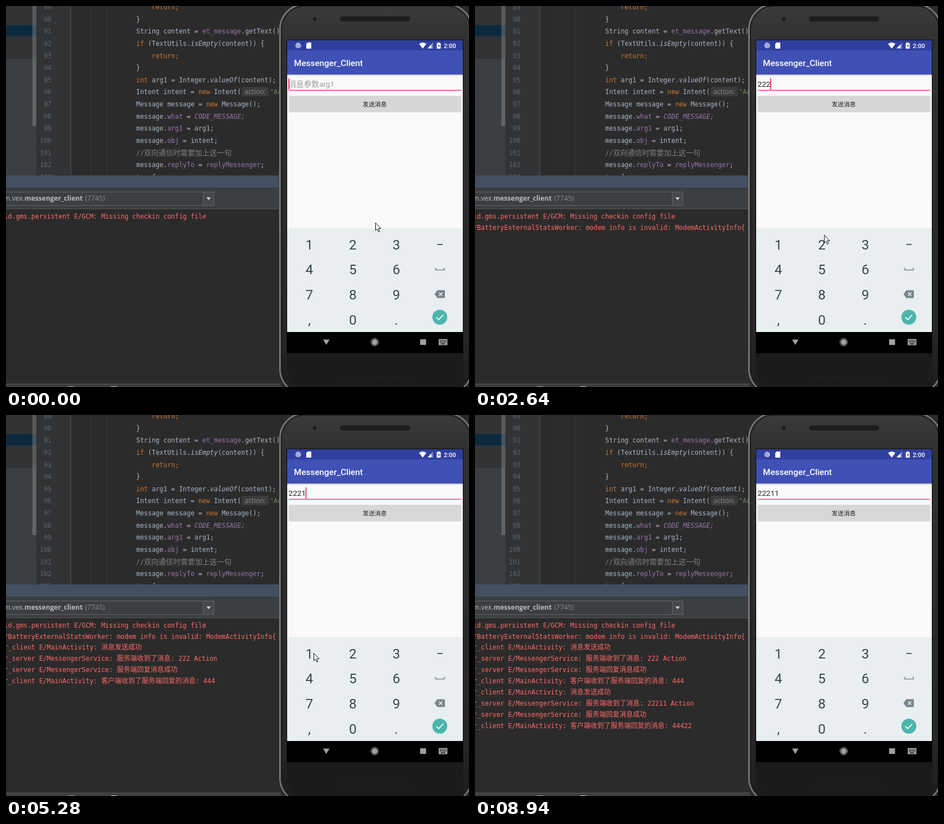
Animation, 825 px wide and 679 px high, one loop 9.04 s. Source, as an HTML page:

```html
<!DOCTYPE html>
<html lang="zh">
<head>
<meta charset="utf-8">
<title>Messenger_Client</title>
<style>
html, body { margin: 0; width: 100%; height: 100%; overflow: hidden; background: #2b2b2b; }
svg { display: block; width: 825px; height: 679px; }
text { white-space: pre; }
.mono { font: 11.5px 'DejaVu Sans Mono', monospace; fill: #a9b7c6; }
.ui { font: 12.2px 'Open Sans', sans-serif; fill: #bbb; }
.bold { font-size: 12px; font-weight: 700; }
.dim { fill: #8a8a8a; }
.app { font-family: Roboto, 'Noto Sans CJK SC', 'Noto Sans CJK', sans-serif; }
.z { font-family: 'Noto Sans CJK SC', 'Noto Sans CJK', sans-serif; }
.k { fill: #cc7832; }
.f { fill: #9876aa; }
.i { font-style: italic; }
.s { fill: #6a8759; }
.c { fill: #808080; }
#code .z { font-size: 13px; }
#log .z { font-size: 12px; }
#nums text { fill: #606366; text-anchor: end; }
#log text { fill: #ff6b68; }
#keys text { font-size: 24px; fill: #37474f; text-anchor: middle; }
</style>
</head>
<body>
<svg viewBox="0 0 825 679">
  <defs>
    <linearGradient id="shell" x2="0" y2="1">
      <stop offset="0" stop-color="#3b3b3b"/><stop offset=".1" stop-color="#303030"/>
      <stop offset=".85" stop-color="#262626"/><stop offset="1" stop-color="#1c1c1c"/>
    </linearGradient>
    <linearGradient id="drop" x2="0" y2="1">
      <stop offset="0" stop-opacity=".28"/><stop offset="1" stop-opacity="0"/>
    </linearGradient>
    <pattern id="mesh" width="4" height="4" patternUnits="userSpaceOnUse">
      <path fill="#0c0c0c" d="M0 0h4v4h-4z"/><path fill="#454545" d="M0 0h1.5v1.5h-1.5zM2 2h1.5v1.5h-1.5z"/>
    </pattern>
    <clipPath id="editor"><path d="M0 0H490V302H0z"/></clipPath>
  </defs>

  <!-- editor -->
  <path fill="#2b2b2b" d="M0 0H825V679H0z"/>
  <path fill="#313335" d="M0 0H115V302H0z"/>
  <path fill="#3c3f41" d="M0 94H54V302H0z"/>
  <path fill="#0d293e" d="M0 34H54V54H0z"/>
  <path fill="#a6a6a6" opacity=".35" d="M47 0H54V214H47z"/>
  <path stroke="#555" d="M115.5 0V302"/>
  <path stroke="#373737" d="M151.5 0V302M179.5 0V302"/>
  <g clip-path="url(#editor)">
    <g id="nums" class="mono"></g>
    <rect x="420" y="144" width="48" height="17" rx="3" fill="#3b3b3b"/>
    <text class="ui dim" x="425" y="157">action:</text>
    <g id="code" class="mono"></g>
    <text class="mono s" x="470" y="157.400">"Action"</text>
  </g>

  <!-- log panel -->
  <path fill="#3c3f41" d="M0 324H490V362H0zM0 673H490V679H0z"/>
  <path fill="#435062" d="M0 302H490V324H0z"/>
  <path stroke="#2f3234" d="M0 324.5H490"/>
  <path stroke="#555" d="M0 361.5H490M0 673.5H490"/>
  <path fill="#45494a" d="M351 331H371V356H351z"/>
  <path fill="none" stroke="#646464" d="M0 331.5H370.5V355.5H0M351.5 331V356"/>
  <path fill="#ccc" d="M357 341h8l-4 5z"/>
  <text class="ui" x="33" y="347" text-anchor="end">m.vex.</text>
  <text class="ui bold" x="33" y="347">messenger_client</text>
  <text class="ui dim" x="141" y="347">(7745)</text>
  <path fill="#aaa" d="M110 678h11v1h-11z"/>
  <path fill="#e8c78a" d="M187 678h11v1h-11z"/>
  <g id="log" class="mono"></g>

  <!-- phone -->
  <path fill="#3a3a3a" d="M486 287H489V400H486z"/>
  <rect x="488" y="-3" width="342" height="694" rx="44" fill="url(#shell)" stroke="#858585" stroke-width="2"/>
  <rect x="489.500" y="-1.500" width="339" height="691" rx="43" fill="none" stroke="#4c4c4c"/>
  <rect x="491" y="0" width="336" height="688" rx="42" fill="none" stroke="#1a1a1a" stroke-width="1.500"/>
  <path fill="#1b1b1b" d="M500 618H815V679H518Q500 665 500 640z"/>
  <circle cx="550" cy="23" r="3.500" fill="#1d1d1f"/>
  <rect x="595" y="18.500" width="125" height="9" rx="4.500" fill="url(#mesh)"/>
  <rect x="598" y="659" width="123" height="9" rx="4.500" fill="url(#mesh)"/>
  <path fill="#0c0c0c" d="M500 60H815V619H500z"/>

  <g class="app">
    <path fill="#fafafa" d="M501 122H814V396H501z"/>
    <path fill="url(#drop)" d="M501 122H814V125H501z"/>
    <path fill="#303f9f" d="M501 61H814V79H501z"/>
    <path fill="#3f51b5" d="M501 79H814V122H501z"/>
    <circle cx="520.500" cy="70.500" r="5" fill="#9fa8da"/>
    <path fill="none" stroke="#c5cae9" d="M517 67a5 5 0 0 1 7 7"/>
    <path fill="#fff" d="M537.500 65H543Q544 65 544 66V75Q544 76 543 76H536Q535 76 535 75V67.500z
      M736 67.500Q742.500 62.500 749 67.500L742.500 76z M761 65.500V75.500H751z
      M769.500 65h3v1h2v10h-7v-10h2z"/>
    <path fill="#303f9f" d="M771.500 67.500l-2 4h1.500v3l2-4h-1.500z"/>
    <path fill="#7c87c4" d="M758 68.500L761 65.500V75.500H758z"/>
    <text x="780" y="74.500" font-size="11" font-weight="500" fill="#fff">2:00</text>
    <text x="513" y="106.500" font-size="15.3" font-weight="500" fill="#fff">Messenger_Client</text>

    <text id="field" x="503.500" y="144" font-size="13.6"></text>
    <path fill="#ff4081" d="M504 149.500H811V151H504z"/>
    <path id="caret" fill="#ff4081" d="M0 129h2v20h-2z"/>
    <rect id="shade" x="502" y="160" width="310.500" height="32" rx="3" opacity=".18"/>
    <rect id="button" x="503.500" y="160" width="308" height="29.500" rx="2"/>
    <text class="z" x="657" y="178.500" font-size="10.75" font-weight="500" fill="#1c1c1c" text-anchor="middle">发送消息</text>

    <path fill="#e9eef1" d="M501 396H814V581H501z"/>
    <path id="press" fill="#d9dee1" d="M580 401h77.500v45.500h-77.500z"/>
    <g id="keys"></g>
    <path stroke="#37474f" stroke-width="1.700" d="M768.500 425H778"/>
    <path fill="none" stroke="#7b888e" stroke-width="1.600" d="M765.500 466.500v4h15.500v-4"/>
    <path fill="#78868c" d="M763.500 513.500l5-7H781q1 0 1 1v12q0 1-1 1H768.500z"/>
    <path stroke="#e9eef1" stroke-width="1.600" d="M771.500 510.500l6 6m0-6l-6 6"/>
    <circle cx="773" cy="554.500" r="13.300" fill="#4db6ac"/>
    <path fill="none" stroke="#fff" stroke-width="1.800" d="M767 555l4 4 8-8.500"/>

    <path d="M501 581H814V618H501z"/>
    <path fill="#a0a0a0" d="M565 594.500h11.500l-5.750 9.500zM738 594h10.500v10h-10.500zM771 593.500h15.500v11h-15.500z"/>
    <circle cx="657" cy="599" r="5.200" fill="#a0a0a0"/>
    <circle cx="657" cy="599" r="6.700" fill="none" stroke="#a0a0a0"/>
    <path stroke="#000" stroke-width="1.300" stroke-dasharray="1.400 1.100" d="M773 596.500h12M773 599h12"/>
    <path stroke="#000" stroke-width="1.300" d="M775 602h7.500"/>
  </g>
  <path id="mouse" fill="#fff" stroke="#111" d="M.5 .5V14L3.500 11.200 5.700 16.300 7.800 15.400 5.600 10.400H10z"/>
</svg>
<script>
const LOOP = 9040;
const $ = id => document.getElementById(id);

// ~x ...~ gives a token the class x; runs of Chinese get their own font
const mark = s => s
  .replace(/~(\w+) (.*?)~/g, (_, c, body) => `<tspan class="${[...c].join(' ')}">${body}</tspan>`)
  .replace(/[\u4e00-\u9fff]+/g, '<tspan class="z">$&</tspan>');
const line = (x, y, s) => `<text x="${x}" y="${y}">${mark(s)}</text>`;

const code = [
  '    ~k return;~',
  '}',
  'String content = ~f et_message~.getText()',
  '~k if~ (TextUtils.~i isEmpty~(content)) {',
  '    ~k return;~',
  '}',
  '~k int~ arg1 = Integer.~i valueOf~(content);',
  'Intent intent = ~k new~ Intent(',
  'Message message = ~k new~ Message();',
  'message.~f what~ = ~fi CODE_MESSAGE;~',
  'message.~f arg1~ = arg1;',
  'message.~f obj~ = intent;',
  '~c //双向通信时需要加上这一句~',
  'message.~f replyTo~ = ~f replyMessenger~;',
  '~k try~ {'
];
const rowY = i => 6 + i * 21.63;
$('code').innerHTML = code.map((s, i) => line(232, rowY(i), s)).join('');
$('nums').innerHTML = code.map((s, i) => line(81, rowY(i), `${89 + i}`)).join('');

const reply = (sent, got) => [
  'r_client E/MainActivity: 消息发送成功',
  `r_server E/MessengerService: 服务端收到了消息: ${sent} Action`,
  'r_server E/MessengerService: 服务端回复消息成功',
  `r_client E/MainActivity: 客户端收到了服务端回复的消息: ${got}`
];
const logs = [
  'id.gms.persistent E/GCM: Missing checkin config file',
  '/BatteryExternalStatsWorker: modem info is invalid: ModemActivityInfo{',
  ...reply(222, 444), ...reply(22211, 44422)
];
$('log').innerHTML = logs.map((s, i) => line(-3.4, 378.6 + i * 19.9, s)).join('');
const logRows = [...$('log').children];

$('keys').innerHTML = [...'123456789,0.'].map((ch, i) =>
  line(540.5 + i % 3 * 77.5, 433.5 + Math.floor(i / 3) * 44.8, ch)).join('');

const bursts = [
  [280, 280, 1], [810, 1740, 8], [1860, 2640, 7], [3010, 3970, 7], [4090, 5000, 8],
  [5150, 5810, 6], [6210, 6750, 5], [7020, 7950, 8], [8100, 8410, 3], [8940, 8940, 1]
];
function captured(t) {
  let shown = 0;
  for (const [from, to, n] of bursts) {
    if (t < from) break;
    const step = (to - from) / (n - 1) || 0;
    shown = step ? from + step * Math.min(n - 1, Math.floor((t - from) / step + 0.2)) : from;
  }
  return shown;
}

// time, x, y of the pointer
const path = [
  [0, 658, 386], [280, 658, 386], [810, 655, 395], [1076, 630, 452], [1341, 612, 432], [1474, 610, 428],
  [1740, 612, 424], [1990, 623, 406], [2640, 622, 408], [3010, 622, 390], [3170, 624, 300], [3330, 622, 190],
  [3490, 621, 173], [3970, 621, 173], [4090, 630, 185], [4350, 645, 250], [4740, 590, 400], [5000, 548, 424],
  [5420, 548, 424], [5546, 552, 410], [5678, 585, 285], [5810, 608, 173], [6750, 608, 173], [7020, 595, 195],
  [7285, 482, 400], [7685, 790, 520], [7950, 765, 592], [8100, 760, 640], [8255, 757, 659], [8410, 757, 690]
];
function pointer(t) {
  const i = path.findIndex(p => p[0] > t);
  if (i < 0) return path[path.length - 1].slice(1);
  const [a, b] = [path[i - 1], path[i]], k = (t - a[0]) / (b[0] - a[0]);
  return [1, 2].map(j => a[j] + (b[j] - a[j]) * k);
}

const typed = [1600, 1980, 2400, 5140, 5400];
const logTimes = [0, 1950, 3300, 6470];
const logCounts = [1, 2, 6, 10];
const within = (t, ...spans) => spans.some(([a, b]) => t >= a && t < b);
const show = (el, on) => el.style.display = on ? '' : 'none';

function draw(now) {
  const t = captured(now % LOOP);
  const n = typed.filter(at => at <= t).length;
  const field = $('field');
  field.innerHTML = n ? '22211'.slice(0, n) : mark('消息参数arg1');
  field.setAttribute('fill', n ? '#212121' : '#9c9c9c');

  const since = t - (n ? typed[n - 1] : -220);
  show($('caret'), since % 1000 < 500);
  $('caret').setAttribute('transform', `translate(${503 + n * 7.63})`);

  const count = logCounts[logTimes.filter(at => at <= t).length - 1];
  logRows.forEach((row, i) => show(row, i < count));

  show($('press'), within(t, [1450, 1600], [1850, 2100], [2240, 2500]));
  const raised = within(t, [3320, 3400], [6300, 6470]);
  const pressed = within(t, [3400, 3700], [6470, 6600]);
  show($('shade'), raised);
  $('button').setAttribute('fill', pressed ? '#c5c5c5' : raised ? '#d0d1d1' : '#d6d7d7');

  $('mouse').setAttribute('transform', `translate(${pointer(t).map(Math.round)})`);
  requestAnimationFrame(draw);
}
draw(0);
</script>
</body>
</html>
```
